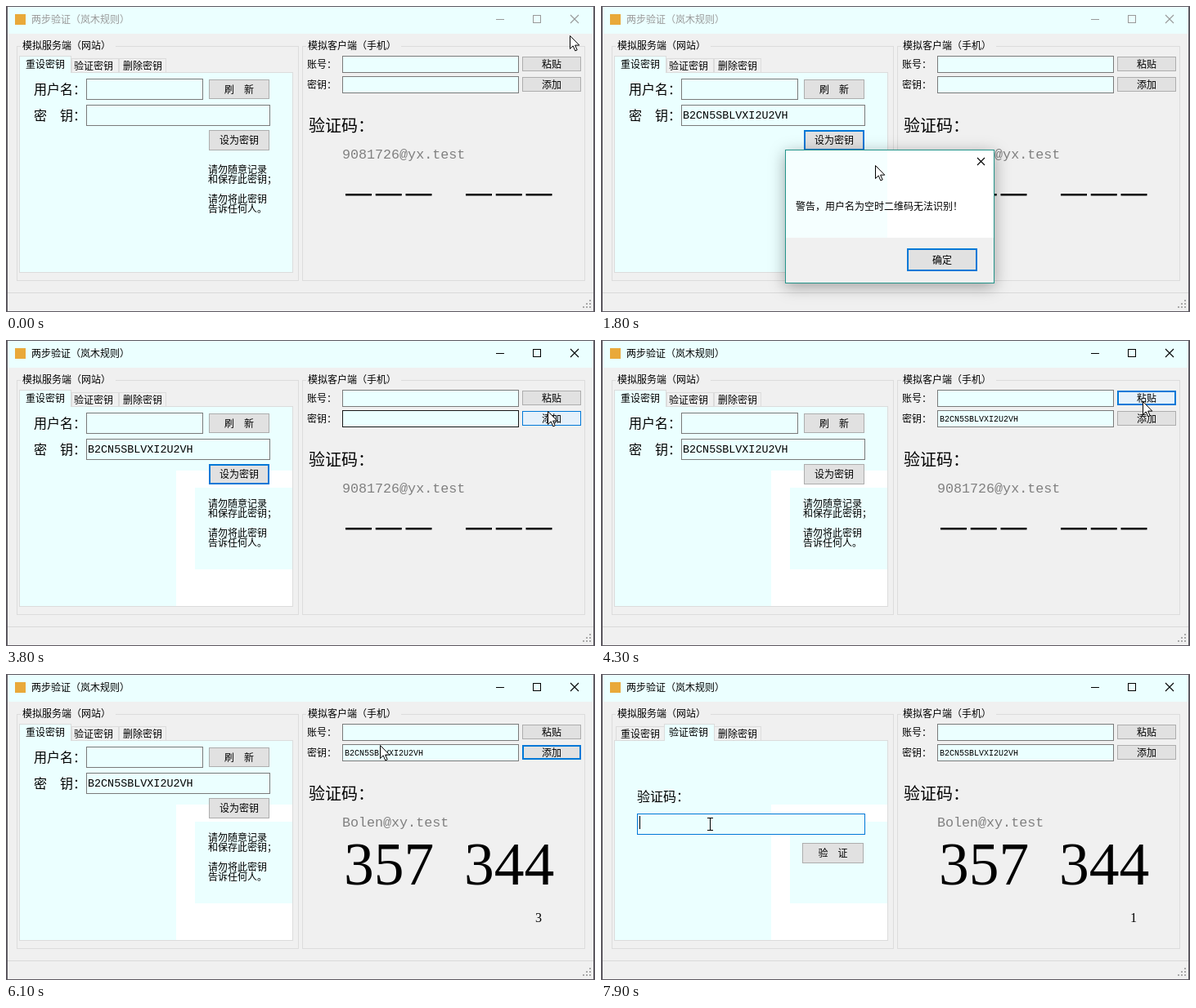
Recreate the animation shown at these times as an HTML page with a canvas. Size 720 by 375 pixels, loop 8000 ms.

```html
<!DOCTYPE html>
<html lang="zh-CN">
<head>
<meta charset="utf-8">
<style>
html, body { margin: 0; width: 100%; height: 100%; overflow: hidden; background: #f0f0f0 }
canvas { display: block }
</style>
</head>
<body>
<canvas id="stage" width="720" height="375"></canvas>
<script>
const ctx = document.getElementById('stage').getContext('2d');
const CJK = '"Noto Sans CJK SC", "Noto Sans CJK", sans-serif';
const MONO = '"Liberation Mono", monospace';
const SERIF = '"Liberation Serif", serif';
const AZURE = '#ebffff', BLUE = '#0078d7', EDGE = '#dcdcdc', FACE = '#f0f0f0';
const LOOP = 8000, STEP = 100;
const KEY = 'B2CN5SBLVXI2U2VH';

// pointer stops: time, x, y
const PATH = [
  [0, 689, 36], [700, 290, 100], [900, 290, 102], [1100, 297, 159], [1400, 297, 159],
  [1800, 335, 195], [2300, 395, 300], [3000, 395, 300], [3800, 662, 87], [3900, 662, 76],
  [4500, 662, 74], [4700, 686, 96], [5700, 686, 96], [6600, 138, 74], [6700, 131, 72],
  [7000, 131, 72], [7600, 133, 184], [LOOP, 133, 184]
];
const CLICKS = [800, 1300, 2400, 4100];

let t = 0, mouse = { x: 0, y: 0 };

const during = (from, to) => t >= from && t < to;
const over = (x, y, w, h) => mouse.x >= x && mouse.x < x + w && mouse.y >= y && mouse.y < y + h;

function pointerAt(time) {
  const i = PATH.findIndex(p => p[0] > time);
  const [t0, x0, y0] = PATH[i - 1], [t1, x1, y1] = PATH[i];
  const u = (time - t0) / (t1 - t0), k = u * u * (3 - 2 * u);
  return { x: Math.round(x0 + (x1 - x0) * k), y: Math.round(y0 + (y1 - y0) * k) };
}

function fill(x, y, w, h, color) {
  ctx.fillStyle = color;
  ctx.fillRect(x, y, w, h);
}

function frame(x, y, w, h, color, line = 1) {
  ctx.strokeStyle = color;
  ctx.lineWidth = line;
  ctx.strokeRect(x + line / 2, y + line / 2, w - line, h - line);
}

function box(x, y, w, h, back, edge, line) {
  fill(x, y, w, h, back);
  frame(x, y, w, h, edge, line);
}

function write(text, x, baseline, size, family, color = '#000', align = 'left') {
  ctx.font = `${size}px ${family}`;
  ctx.fillStyle = color;
  ctx.textAlign = align;
  ctx.fillText(text, x, baseline);
}

// Chinese text, placed by its vertical centre
const label = (text, x, cy, size = 12, color, align) =>
  write(text, x, cy + size * 0.38, size, CJK, color, align);

function lines(points, color, width = 1) {
  ctx.strokeStyle = color;
  ctx.lineWidth = width;
  ctx.beginPath();
  for (const [x0, y0, x1, y1] of points) {
    ctx.moveTo(x0, y0);
    ctx.lineTo(x1, y1);
  }
  ctx.stroke();
}

const cross = (x, y, size, color) =>
  lines([[x, y, x + size, y + size], [x + size, y, x, y + size]], color, 1.1);

function button(x, y, w, h, text, focused, enabled = true) {
  const hot = enabled && over(x, y, w, h), down = hot && CLICKS.includes(t);
  box(x, y, w, h, down ? '#cce4f7' : hot ? '#e5f1fb' : '#e1e1e1',
    hot || focused ? BLUE : '#adadad', focused && (!hot || t < 5000) ? 2 : 1);
  label(text, x + w / 2, y + h / 2, 12, '#000', 'center');
}

const field = (x, y, w, h, edge = '#7a7a7a') => box(x, y, w, h, AZURE, edge);

function group(x, w, title) {
  frame(x, 49, w, 288, EDGE);
  fill(x + 5, 47, 116, 5, FACE);
  label(title, x + 7, 48);
}

function titleBar(active) {
  const ink = active ? '#000' : '#999';
  fill(0, 0, 720, 375, '#5c5860');
  fill(2, 1, 716, 373, FACE);
  fill(2, 1, 716, 33, AZURE);
  fill(11, 10, 13, 13, '#e9a93a');
  label('两步验证（岚木规则）', 31, 16, 12, ink);
  fill(599, 16, 10, 1, ink);
  frame(644, 11, 10, 10, ink);
  cross(690, 11, 10, ink);
}

function statusStrip() {
  fill(2, 351, 716, 1, '#d9d9d9');
  for (let row = 0; row < 3; row++)
    for (let col = 2 - row; col < 3; col++)
      fill(705 + col * 4, 360 + row * 4, 2, 2, '#a8a8a8');
}

function tabs(selected) {
  ['重设密钥', '验证密钥', '删除密钥'].forEach((name, i) => {
    const x = [18, 80, 138][i], w = [62, 58, 58][i];
    if (i === selected) return;
    const hot = over(x, 64, w, 17);
    box(x, 64, w, 18, hot ? '#d8eaf9' : FACE, EDGE);
    label(name, [24, 83, 143][i], 73);
  });
  box(16, 81, 335, 246, AZURE, EDGE);
  const [x, w] = selected ? [77, 62] : [16, 64];
  box(x, 61, w, 21, AZURE, EDGE);
  fill(x + 1, 80, w - 2, 3, AZURE);
  label(selected ? '验证密钥' : '重设密钥', selected ? 83 : 24, 71);
}

function resetPage(enabled) {
  label('用户名：', 34, 102, 16);
  label('密　钥：', 34, 134, 16);
  field(98, 89, 143, 26);
  field(98, 121, 225, 26, during(1000, 1300) ? '#171717' : undefined);
  if (t >= 900) write(KEY, 100, 138, 13.4, MONO);
  button(248, 90, 74, 24, '刷　新', during(800, 1300), enabled);
  button(248, 152, 74, 25, '设为密钥', during(1300, 4100), enabled);
  ['请勿随意记录', '和保存此密钥；', '', '请勿将此密钥', '告诉任何人。']
    .forEach((text, i) => label(text, 247, 200 + i * 12));
}

function verifyPage() {
  const focused = t >= 7700;
  label('验证码：', 44, 150, 16);
  field(44, 171, 279, 26, focused ? BLUE : undefined);
  if (focused) fill(47, 174, 1, 16, '#000');
  button(246, 207, 75, 25, '验　证');
}

function client(enabled) {
  group(362, 346, '模拟客户端（手机）');
  label('账号：', 368, 71);
  label('密钥：', 368, 96);
  field(411, 61, 216, 21);
  field(411, 86, 216, 21, during(3600, 3900) ? '#171717' : undefined);
  if (t >= 4200) write(KEY, 414, 100, 10, MONO);
  button(631, 62, 72, 18, '粘贴', during(4100, 5300), enabled);
  button(631, 87, 72, 18, '添加', during(5300, 6900), enabled);
  label('验证码：', 370, 146, 20);
  write(t < 5300 ? '9081726@yx.test' : 'Bolen@xy.test', 411, 187, 16.7, MONO, '#808080');
  if (t < 5400) {
    for (const i of [0, 1, 2, 4, 5, 6]) fill(415 + i * 36.75, 230, 32, 2.5, '#000');
  } else {
    write('357', 413, 258, 73.5, SERIF);
    write('344', 560, 258, 73.5, SERIF);
  }
  if (t >= 5300) write(3 - Math.floor((t - 5300) / 1000), 647, 304, 16, SERIF);
}

function dialog() {
  ctx.save();
  ctx.shadowColor = 'rgba(0,0,0,.35)';
  ctx.shadowBlur = 18;
  ctx.shadowOffsetY = 4;
  fill(225, 176, 256, 164, '#fff');
  ctx.restore();
  fill(226, 177, 124, 108, '#f5ffff');
  fill(226, 284, 254, 55, FACE);
  frame(225, 176, 256, 164, '#24948a');
  cross(460, 186, 9, '#000');
  label('警告，用户名为空时二维码无法识别！', 238, 245);
  button(374, 297, 86, 28, '确定', true);
}

function pointer() {
  const { x, y } = mouse;
  if (t >= 6900 && over(44, 171, 279, 26)) {
    lines([[x + .5, y - 7, x + .5, y + 7], [x - 3, y - 7.5, x + 4, y - 7.5],
      [x - 3, y + 7.5, x + 4, y + 7.5]], '#000');
    return;
  }
  const arrow = new Path2D(`M${x + .5} ${y + .5}v16l3.7-3.6 2.6 6 2.4-1-2.6-5.8h5.2z`);
  ctx.fillStyle = '#fff';
  ctx.fill(arrow);
  ctx.strokeStyle = '#000';
  ctx.lineWidth = 1;
  ctx.stroke(arrow);
}

function draw(now) {
  t = Math.floor(now % LOOP / STEP) * STEP;
  mouse = pointerAt(t);
  const modal = during(1500, 2500), verifying = t >= 6900;
  titleBar(t >= 700 && !modal);
  statusStrip();
  group(13, 345, '模拟服务端（网站）');
  tabs(verifying ? 1 : 0);
  if (t >= 2500) {
    fill(208, 160, 142, 166, '#fff');
    fill(231, 181, 119, 100, AZURE);
  }
  if (verifying) verifyPage();
  else resetPage(!modal);
  client(!modal);
  if (modal) dialog();
  pointer();
}

const start = performance.now();
(function tick() {
  draw(performance.now() - start);
  requestAnimationFrame(tick);
})();
</script>
</body>
</html>
```
